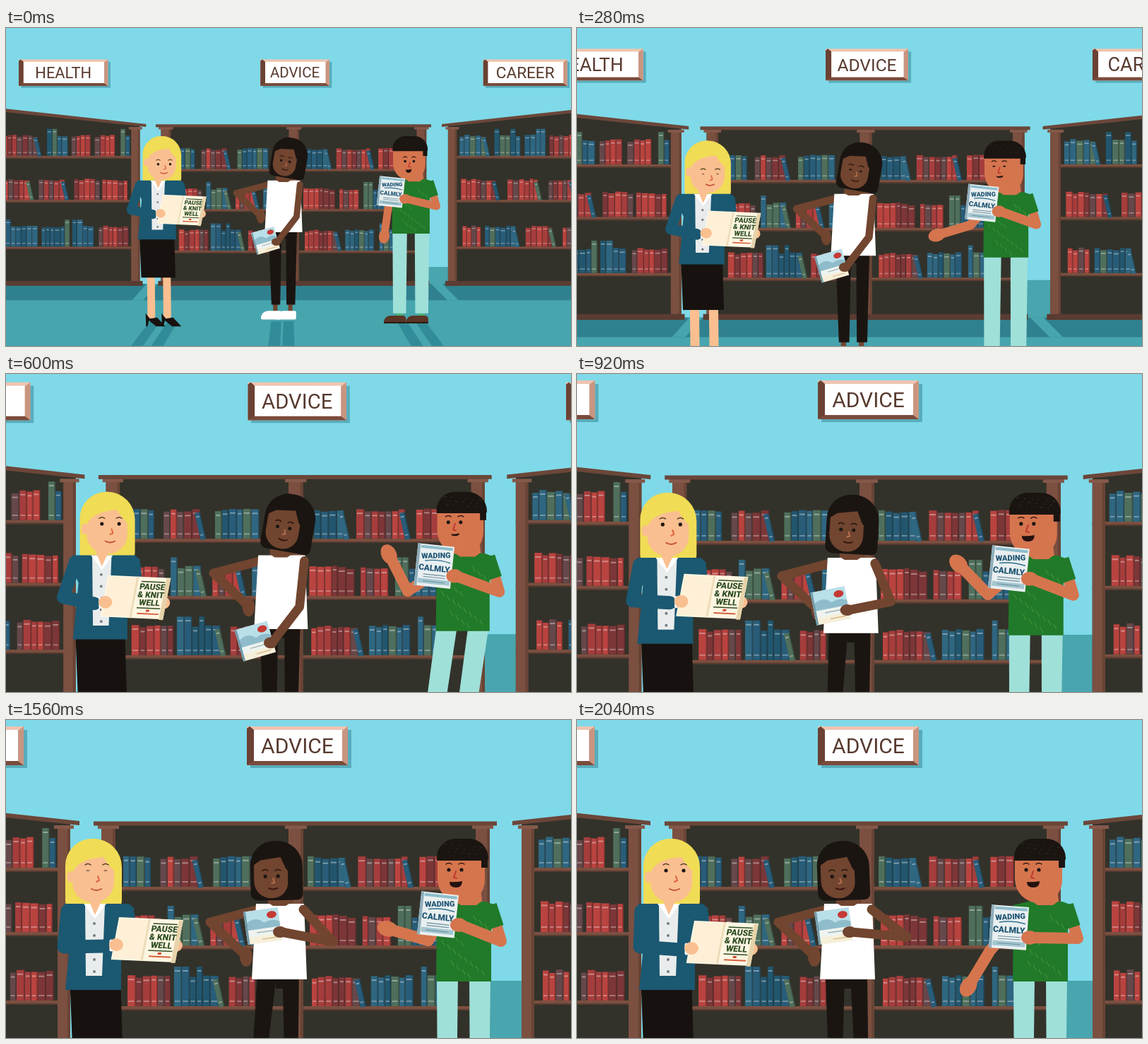
An HTML page with a canvas for the animation above (2080 ms loop, 800 by 450 pixels).

```html
<!DOCTYPE html>
<html lang="en">
<head>
<meta charset="utf-8">
<title>Library</title>
<style>
html, body { margin: 0; height: 100%; overflow: hidden; background: #7fd9e8; }
canvas { display: block; }
</style>
</head>
<body>
<canvas id="stage" width="800" height="450"></canvas>
<script>
const c = document.getElementById('stage').getContext('2d');
const LOOP = 2080, STEP = 40;
const SKY = '#7fd9e8', WOOD = '#7b5040', WOOD_DARK = '#5a3c32', DARK = '#32322a';
const PALE = '#fabf90', BROWN = '#71452f', TAN = '#d5754e', NAVY = '#1b5871';
const HAIR = '#f0dc55', BLACK = '#1b1512', GREEN = '#217a29';
const WARM = ['#b9433f', '#a53d3c', '#7c3638', '#66474a'];
const COOL = ['#285c78', '#22566e', '#2f6680', '#4f6f5c'];
let time = 0;

// Timing rules
function ease(from, to) {
  const u = Math.min(1, Math.max(0, (time - from) / (to - from)));
  return u * u * (3 - 2 * u);
}
const near = (moment, spread) => Math.exp(-(((time - moment) / spread) ** 2));
// Holds the first pose, settles into the second, ends in the third
const pose = (first, second, last = second) =>
  first + (second - first) * ease(600, 1160) + (last - second) * ease(1600, 2040);

function seeded(seed) {
  return () => {
    seed = (seed * 16807 + 11) % 2147483647;
    return seed / 2147483647;
  };
}

// Drawing helpers
function rect(x, y, w, h, fill) { c.fillStyle = fill; c.fillRect(x, y, w, h); }
function box(x, y, w, h, r, fill) {
  c.fillStyle = fill; c.beginPath(); c.roundRect(x, y, w, h, r); c.fill();
}
function poly(fill, ...p) {
  c.fillStyle = fill; c.beginPath();
  for (let i = 0; i < p.length; i += 2) c.lineTo(p[i], p[i + 1]);
  c.fill();
}
function oval(x, y, rx, ry, fill) {
  c.fillStyle = fill; c.beginPath(); c.ellipse(x, y, rx, ry, 0, 0, 7); c.fill();
}
function line(width, color, ...p) {
  c.strokeStyle = color; c.lineWidth = width; c.beginPath();
  for (let i = 0; i < p.length; i += 2) c.lineTo(p[i], p[i + 1]);
  c.stroke();
}
function curve(width, color, x, y, half, bend) {
  c.strokeStyle = color; c.lineWidth = width; c.beginPath();
  c.moveTo(x - half, y); c.quadraticCurveTo(x, y + bend, x + half, y); c.stroke();
}
function text(s, x, y, size, fill, weight = 900) {
  c.font = `${weight} ${size}px Roboto, sans-serif`;
  c.textAlign = 'center'; c.fillStyle = fill; c.fillText(s, x, y);
}
function turned(x, y, angle, draw) {
  c.save(); c.translate(x, y); c.rotate(angle * Math.PI / 180); draw(); c.restore();
}

function spine(x, base, w, h, color, lean = 0) {
  turned(x, base, lean, () => {
    rect(0, -h, w, h, color);
    rect(w - 1.5, -h, 1.5, h, '#0003');
    rect(1, 5 - h, w - 3, 2, '#ffffff60');
    rect(1, -8, w - 3, 2, '#ffffff50');
  });
}
function books(x, end, base) {
  const rnd = seeded(base * 7919 + Math.abs(x) * 104729);
  const pick = list => list[Math.floor(rnd() * list.length)];
  while (x < end) {
    const shades = rnd() < .55 ? WARM : COOL;
    for (let n = 3 + rnd() * 4; n > 0 && x < end; n--) {
      const w = 8 + rnd() * 4, tall = shades === COOL && rnd() < .15;
      spine(x, base, w, tall ? 56 : 39 + rnd() * 5, pick(shades));
      x += w + .5;
    }
    if (rnd() < .5 && x < end) {
      spine(x, base + 2, 8, 40, pick(COOL), -13);
      x += 10;
    }
    x += 4 + rnd() * 9;
  }
}

function shelves(x, w, levels, spans) {
  levels.forEach((y, i) => {
    rect(x, y, w, 4, WOOD);
    rect(x, y + 4, w, 2, WOOD_DARK);
    spans.forEach(([from, to]) => books(from + i * 3, to, y));
  });
  rect(x, 468, w, 10, WOOD_DARK);
}
function post(x, w) {
  rect(x, 150, w, 322, WOOD);
  rect(x + w - 4, 150, 4, 322, '#694436');
  rect(x - 5, 149, w + 10, 5, '#85594a');
  rect(x - 6, 468, w + 12, 10, WOOD_DARK);
}
// Side cases rise away from the middle one
function sideCase(inner, dir) {
  const far = inner + dir * 404, edge = inner + dir * 13;
  poly(DARK, edge, 146, far, 100, far, 474, edge, 474);
  poly('#6b4639', inner, 143, far, 99, far, 106, inner, 149);
  shelves(Math.min(edge, far), 391, [209, 300, 397], [dir < 0 ? [-193, 62] : [754, 1020]]);
  post(dir < 0 ? 73 : 730, 18);
}

function room(away) {
  rect(-300, -100, 1500, 800, SKY);
  rect(680, 369 + 70 * away, 60, 120, '#49a5ae');
  rect(-300, 474, 1500, 260, '#46a5ad');
  rect(-300, 474, 1500, 34, '#30818f');
  poly('#46a5ad', 75, 508, 105, 474, 128, 474, 98, 508);
  poly('#46a5ad', 695, 474, 718, 474, 752, 508, 729, 508);
  [123, 160, 374, 400, 635, 673].forEach(x => {
    const slide = (x - 400) * .18;
    poly('#328b98', x - 11, 552, x + 10, 552, x + slide + 12, 620, x + slide - 14, 620);
  });
  sideCase(104, -1);
  sideCase(717, 1);
  rect(135, 147, 550, 330, DARK);
  shelves(135, 550, [236, 319, 405], [[166, 348], [427, 612]]);
  [[135, 20], [400, 21], [665, 20]].forEach(p => post(...p));
  rect(124, 143.5, 571, 6, '#6b4639');
}

function sign(x, w, word, size) {
  rect(x + 5, 14, w, 54, '#3f8fa199');
  rect(x, 9, w, 55, '#eec4b0');
  poly('#c99580', x + w, 9, x + w, 64, x + w - 8, 58, x + w - 8, 15);
  poly('#7a4b3b', x, 64, x + 9, 58, x + w - 8, 58, x + w, 64);
  poly('#6b4133', x, 12, x + 4, 9, x + 10, 14, x + 10, 58, x, 64);
  rect(x + 10, 14, w - 18, 44, '#fff');
  text(word, x + w / 2, 36 + size * .37, size, '#583a2f', 400);
}

function eyes(x, y, gap, open, brow) {
  [0, gap].forEach(d => {
    oval(x + d, y, 2.6, .6 + 2 * open, '#1d1715');
    curve(1.5, brow, x + d, y - 8, 4, -3);
  });
}

function blonde() {
  const sway = pose(3, 0, 4), headX = pose(137, 124, 134);
  const bookX = pose(138, 160, 166), bookY = pose(289, 279, 284);
  const elbow = pose(70, 82, 85);
  const look = 13 * (1 - ease(280, 680));
  const open = 1 - near(280, 90) - near(1560, 90);

  // Legs, heels, skirt
  [114, 147].forEach(x => {
    line(16, PALE, x, 455, x + 1, 540);
    poly('#17120f', x - 11, 535, x - 2, 546, x + 13, 544, x + 30, 562, x + 11, 562, x - 4, 550, x - 7, 562, x - 10, 562);
  });
  poly('#17120f', 90, 360, 162, 360, 165, 461, 94, 461);

  box(headX - 40, 168, 80, 100, [38, 40, 12, 12], HAIR);
  line(20, NAVY, 172 + sway, 274, 176 + sway, 318, bookX + 66, bookY + 40);

  // Jacket and shirt
  turned(sway, 0, 0, () => {
    poly(NAVY, 78, 266, 84, 260, 174, 260, 182, 267, 163, 300, 163, 382, 84, 382, 92, 300);
    poly('#e9ecec', 112, 262, 140, 262, 136, 362, 113, 362);
    poly('#fff', 110, 260, 126, 281, 142, 260);
    poly(PALE, 115, 250, 138, 250, 126, 276);
    for (let y = 288; y < 360; y += 17) oval(125, y, 2, 2, '#747c80');
  });

  // Head
  box(headX - 30, 190, 59, 68, [20, 14, 28, 28], PALE);
  oval(headX - 33, 222, 5, 8, PALE);
  c.fillStyle = HAIR; c.beginPath();
  c.moveTo(headX - 38, 212);
  c.quadraticCurveTo(headX - 36, 168, headX, 168);
  c.quadraticCurveTo(headX + 39, 171, headX + 38, 222);
  c.quadraticCurveTo(headX + 22, 208, headX + 14, 194);
  c.quadraticCurveTo(headX - 20, 196, headX - 29, 214);
  c.fill();
  eyes(headX - 8, 213 + look, 25, open, '#4b3a20');
  line(2, '#df633f', headX + 6, 221 + look * .6, headX + 8, 227 + look * .6, headX + 4, 229 + look * .6);
  curve(2, '#c54f3b', headX + 4, 239 + look * .35, 7, 4);

  // Open book
  oval(bookX + 80, bookY + 40, 10, 9, PALE);
  c.save();
  c.transform(1, .045, -.19, 1, bookX, bookY);
  rect(0, 0, 91, 60, '#fff6e2');
  rect(2, 2, 41, 56, '#fef0d6');
  rect(42, 0, 3, 60, '#ecdcb8');
  rect(85, 1, 6, 60, '#e6d3aa');
  const ink = '#2f4e24';
  ['PAUSE', '& KNIT', 'WELL'].forEach((word, i) => text(word, 67, 18 + i * 11.5, 12, ink));
  [6, 44].forEach(y => rect(50, y, 34, 1.5, ink));
  rect(64, 47, 5, 3, '#cf4a33');
  rect(52, 52, 31, 2, '#d6603f');
  c.restore();

  // Near arm
  line(19, NAVY, 87 + sway, 271, elbow + sway, 321, bookX - 20, bookY + 41);
  line(5, '#fff', bookX - 11, bookY + 34, bookX - 11, bookY + 46);
  oval(bookX - 4, bookY + 39, 10, 9, PALE);
}

function reader() {
  const x = pose(389, 387, 383), headX = pose(401, 383, 377);
  const foot = pose(0, -18, -7);
  const handX = pose(376, 390, 388), handY = pose(387, 300);
  const open = 1 - .6 * near(280, 90);

  // Legs and shoes
  [[372, foot], [403, 0]].forEach(([legX, shift]) => {
    line(9, BROWN, legX + shift, 500, legX + shift, 535);
    box(legX - 30 + shift, 530, 42, 18, [18, 3, 3, 3], '#fff');
  });
  poly(BLACK, x - 31, 362, x - 4, 362, 382 + foot, 517, 364 + foot, 517);
  poly(BLACK, x - 5, 362, x + 28, 362, 413, 517, 395, 517, x + 5, 380, x - 5, 380);

  // Hand on hip
  line(13, BROWN, x - 33, 269, x - 98, 286, x - 48, 333);
  oval(x - 47, 335, 9, 14, BROWN);

  poly(BROWN, x - 16, 240, x + 18, 240, x + 20, 264, x - 16, 264);
  poly('#fff', x - 33, 260, x + 35, 260, x + 39, 367, x - 39, 367);
  poly(BROWN, x - 17, 258, x + 17, 258, x + 9, 263, x - 9, 263);

  turned(headX, 214, pose(10, -1, -2), () => {
    box(-37, -43, 74, 84, [34, 36, 8, 10], BLACK);
    box(-32, -24, 48, 62, [18, 12, 22, 24], BROWN);
    poly(BLACK, -34, -8, -24, -28, 22, -28, 22, 8, 13, -4, 6, -20, -22, -16);
    eyes(-16, 7, 18, open, '#26140f');
    line(2, '#b86e50', -5, 10, -3, 16, -7, 17);
    curve(2, '#3a1611', -5, 24, 6, 3);
  });

  // Small book
  turned(pose(352, 364), pose(384, 291), pose(-16, -8), () => {
    rect(-25, -23, 49, 47, '#f6efd9');
    rect(-23, -23, 47, 20, '#b9dfe9');
    c.fillStyle = '#8fbccb'; c.beginPath(); c.moveTo(-23, -6);
    c.quadraticCurveTo(-9, -16, 2, -4); c.quadraticCurveTo(14, -9, 24, -3);
    c.lineTo(24, 6); c.lineTo(-23, 6); c.fill();
    rect(-23, 4, 47, 10, '#eef3f0');
    rect(-25, -23, 3, 47, '#6f9bab');
    oval(14, -14, 7, 5, '#c63a35');
    rect(-10, 8, 26, 1.5, '#9fb3b6');
    rect(-4, 18, 22, 1.5, '#d9b98a');
  });
  line(13, BROWN, x + 34, 268, pose(416, 463, 467), pose(335, 314, 307), handX, handY);
  oval(handX - 2, handY, 10, 8, BROWN);
}

function speaker() {
  const x = pose(653, 648, 656), headX = pose(651, 646, 655);
  const lean = -24 * near(600, 170);
  const up = ease(0, 600), out = ease(700, 1240), drop = ease(1680, 2040);

  // Legs and shoes
  [-38, 8].forEach(d => {
    const left = x + d, foot = left + lean;
    rect(foot + 7, 520, 14, 28, '#49b37a');
    poly('#9fe0d9', left, 362, left + 30, 362, foot + 28, 535, foot + 1, 535);
    box(foot - 18, 540, 46, 15, [16, 8, 2, 2], '#5a3424');
    rect(foot - 18, 553, 46, 3, '#2b1913');
  });

  // Gesturing arm swings about its elbow
  const elbowX = 606 - 33 * up + 25 * out - 13 * drop, elbowY = 316 - 4 * up + 14 * drop;
  const angle = 8 + 145 * up - 47 * out - 75 * drop;
  line(16, TAN, x - 30, 280, elbowX, elbowY);
  turned(elbowX, elbowY, angle, () => {
    line(16, TAN, 0, 0, 0, 50);
    oval(0, 60, 11, 15, TAN);
  });

  poly(TAN, x - 13, 240, x + 24, 240, x + 27, 264, x - 13, 264);
  poly(GREEN, x - 38, 262, x - 18, 257, x + 31, 257, x + 45, 262, x + 39, 295, x + 39, 370, x - 39, 370);
  poly(TAN, x - 12, 256, x + 26, 256, x + 18, 262, x - 4, 262);
  for (let i = 0; i < 22; i++) {
    const tickX = x - 33 + i * 29 % 66, tickY = 272 + i * 41 % 88;
    line(1, '#4c9a3e', tickX, tickY, tickX + 4, tickY + 7);
  }

  // Head
  box(headX - 35, 188, 67, 71, [8, 6, 32, 34], TAN);
  box(headX - 36, 168, 73, 31, [32, 34, 4, 0], BLACK);
  rect(headX + 27, 194, 9, 15, BLACK);
  for (let i = 0; i < 20; i++) oval(headX - 25 + i * 17 % 54, 175 + i * 7 % 16, .6, .6, '#55463b');
  const turn = 9 * near(0, 160), faceX = headX + turn, faceY = 212 + turn * .9;
  eyes(faceX - 19, faceY, 18, 1 - .7 * near(280, 90), '#35170f');
  line(2.2, '#c23b32', faceX - 9, faceY + 2, faceX - 12, faceY + 11, faceX - 8, faceY + 12);
  const mouth = 3 + 5 * ease(600, 920) + 4 * near(0, 120), half = 6 + 3 * ease(600, 920);
  const mouthX = headX - 9 + turn * .7, mouthY = faceY + 17;
  c.fillStyle = '#241210'; c.beginPath();
  c.moveTo(mouthX - half, mouthY);
  c.quadraticCurveTo(mouthX, mouthY + 1, mouthX + half, mouthY - 1);
  c.quadraticCurveTo(mouthX + half, mouthY + mouth, mouthX, mouthY + mouth);
  c.quadraticCurveTo(mouthX - half, mouthY + mouth, mouthX - half, mouthY);
  c.fill();

  // Held book
  const lift = 18 * drop + 8 * near(0, 160);
  turned(612, 275 + lift, 6 - 2 * drop, () => {
    rect(-27, -30, 53, 61, '#e9eff0');
    rect(-27, -30, 4, 61, '#8faebb');
    rect(-22, -28, 46, 4, '#8dbdcb');
    rect(-22, 20, 46, 7, '#a3c7d1');
    const ink = '#1f5573';
    turned(1, -11, -7, () => text('WADING', 0, 0, 11, ink));
    curve(1.5, '#2d718d', 4, -6, 18, -4);
    text('CALMLY', 0, 8, 12, ink);
    [13, 16.5, 23].forEach(y => rect(-15, y, 32, 1.2, '#6c8d9b'));
  });

  // Holding arm
  const bendX = x + 53, bendY = 313 - 4 * drop, gripX = 641, gripY = 290 + lift;
  line(16, TAN, x + 41, 272, bendX, bendY, gripX + 2, gripY);
  oval(gripX, gripY, 12, 10, TAN);
  c.lineCap = 'butt';
  line(20, GREEN, x + 37, 262, x + 47, 293);
  c.lineCap = 'round';
}

function draw(now) {
  time = Math.floor(now % LOOP / STEP) * STEP;
  // The camera moves in and settles
  const away = near(0, 376), zoom = 1 - .317 * away;
  c.setTransform(zoom, 0, 0, zoom, 401.6 * (1 - zoom), 120.8 * (1 - zoom));
  c.lineCap = c.lineJoin = 'round';
  room(away);
  sign(-160, 185, 'HEALTH', 32);
  sign(341, 143, 'ADVICE', 30);
  sign(803, 174, 'CAREER', 33);
  blonde();
  reader();
  speaker();
}

const start = performance.now();
function frame() {
  draw(performance.now() - start);
  requestAnimationFrame(frame);
}
frame();
</script>
</body>
</html>
```
